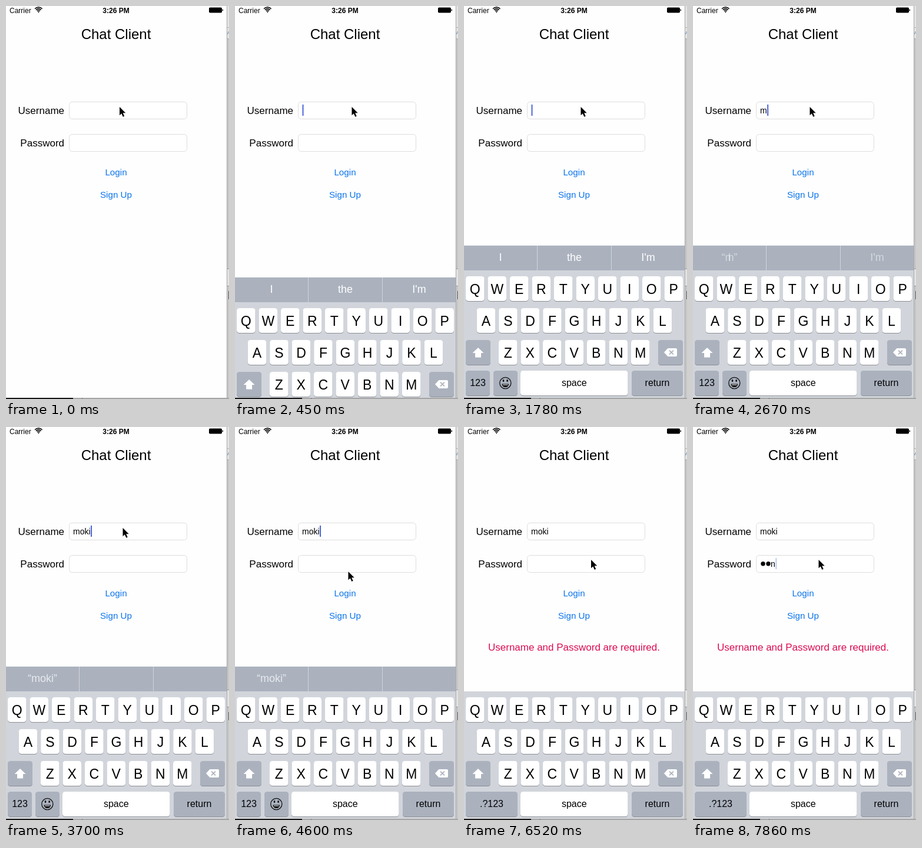
These frames come from a looping animation (379x666 px, 8000 ms). An HTML page with a canvas:

```html
<!DOCTYPE html>
<html lang="en">
<head>
<meta charset="utf-8">
<title>Chat Client login</title>
<style>
html, body { margin: 0; width: 100%; height: 100%; overflow: hidden; }
canvas { display: block; width: 379px; height: 666px; }
</style>
</head>
<body>
<canvas id="stage"></canvas>
<script>
const W = 379, H = 666, LOOP = 8000, STEPS = 54, STEP = LOOP / STEPS;
const FONT = '"Liberation Sans", Arial, sans-serif';
const BAR = '#abb2be', KEYBOARD = '#d1d5db', BLUE = '#0b74ec';
const USER = 'moki';

const FOCUS = 2, TYPED = [16, 19, 22, 24], ERROR = 35, PASSWORD = 39;
const SECRET = [[46, 'm'], [47, 'l'], [49, 'n']];
const POINTER = [[1, 193, 171], [2, 198.5, 171], [28, 198.5, 171], [31, 192.5, 245],
  [33, 187, 277], [35, 187, 277], [38, 216, 225], [52, 216, 225], [53, 213.5, 225]];
const BLINK = [1, 1, 1, 1, 0.35, 0, 0];

const canvas = document.getElementById('stage');
const ctx = canvas.getContext('2d');
const ratio = window.devicePixelRatio || 1;
canvas.width = W * ratio;
canvas.height = H * ratio;

const clamp = v => Math.max(0, Math.min(1, v));

function text(str, x, y, size, color = '#000', align = 'left', weight = '') {
  ctx.font = `${weight} ${size}px ${FONT}`;
  ctx.textAlign = align;
  ctx.fillStyle = color;
  ctx.fillText(str, x, y);
}

function rect(x, y, w, h, color) {
  ctx.fillStyle = color;
  ctx.fillRect(x, y, w, h);
}

function rounded(x, y, w, h, r, color) {
  ctx.beginPath();
  ctx.roundRect(x, y, w, h, r);
  ctx.fillStyle = color;
  ctx.fill();
}

function shape(path, x, y, fill, stroke, width = 1) {
  ctx.save();
  ctx.translate(x, y);
  const p = new Path2D(path);
  if (stroke) {
    ctx.strokeStyle = stroke;
    ctx.lineWidth = width;
    ctx.stroke(p);
  }
  if (fill) {
    ctx.fillStyle = fill;
    ctx.fill(p);
  }
  ctx.restore();
}

function faded(alpha, draw) {
  if (alpha <= 0) return;
  ctx.save();
  ctx.globalAlpha *= alpha;
  draw();
  ctx.restore();
}

function drawDesktop() {
  rect(0, 0, W, H, '#c6c6c6');
  rect(375, 0, 4, 55, '#e3e3e3');
  rect(375, 36, 4, 1, '#bfae9f');
  rect(375, 55, 4, 1, '#aaa');
  text('w', 375, 48, 9, '#7b9cc0');
  rect(375, 445, 4, 30, '#e2e2e2');
  rect(375, 445, 4, 1, '#999');
  rect(375, 474, 4, 1, '#999');
  rect(378, 483, 1, 14, '#555');
  rect(375, 0, 1, H, '#a9a9a9');
  rect(0, 664, W, 2, '#a5a5a5');
  rect(0, 664, 114, 2, '#161616');
  rect(129, 664, 1, 2, '#777');
  rect(0, 0, 375, 664, '#fefefe');
}

function drawStatus() {
  text('Carrier', 6, 11.5, 12);
  text('3:26 PM', 187, 11.5, 12, '#000', 'center', 'bold');
  for (const r of [3.3, 6.1, 8.9]) {
    ctx.beginPath();
    ctx.arc(55.3, 11, r, -Math.PI * 0.75, -Math.PI * 0.25);
    ctx.strokeStyle = '#000';
    ctx.lineWidth = 1.6;
    ctx.stroke();
  }
  shape('M0 0L-1.5-1.6Q0-2.6 1.5-1.6Z', 55.3, 11.4, '#000');
  rounded(345, 2.5, 22, 9, 1.8, '#000');
  rounded(367.6, 5.5, 1.4, 3, 0.7, '#000');
}

function drawField(label, y) {
  text(label, 99, y + 20.5, 17, '#000', 'right');
  ctx.beginPath();
  ctx.roundRect(107.5, y + 0.5, 200, 29, 5);
  ctx.fillStyle = '#fff';
  ctx.fill();
  ctx.strokeStyle = '#dedede';
  ctx.lineWidth = 1;
  ctx.stroke();
}

function drawCaret(x, y, since) {
  faded(BLINK[since % BLINK.length], () => rect(x, y, 2, 19, '#4964dd'));
}

function drawForm(step) {
  text('Chat Client', 187, 56, 24, '#000', 'center');
  drawField('Username', 162);
  drawField('Password', 217);
  text('Login', 187, 287, 15.2, BLUE, 'center');
  text('Sign Up', 187, 325, 15.2, BLUE, 'center');
  if (step >= ERROR)
    text('Username and Password are required.', 187, 379, 17, '#dc0b51', 'center');

  const typed = TYPED.filter(s => s <= step);
  const name = USER.slice(0, typed.length);
  text(name, 114, 182, 14);
  if (step >= FOCUS && step < PASSWORD)
    drawCaret(114.5 + ctx.measureText(name).width, 167, step - (typed.at(-1) ?? FOCUS));

  if (step < PASSWORD) return;
  const secret = SECRET.filter(([s]) => s <= step);
  const [last, letter] = secret.at(-1) ?? [PASSWORD, ''];
  const hidden = Math.max(0, secret.length - 1);
  for (let i = 0; i < hidden; i++) rounded(115.3 + 9 * i, 228, 7.4, 7.4, 3.7, '#000');
  text(letter, 114 + 9 * hidden, 237, 14);
  drawCaret(114.5 + 9 * hidden + ctx.measureText(letter).width, 222, step - last);
}

function drawSuggestions(step) {
  rect(0, 406, 375, 42, BAR);
  for (const x of [124, 250]) rect(x, 406, 1, 42, '#d0d4da');
  const put = (str, x) => text(str, x, 432, 18, '#fff', 'center');
  const fade = clamp((step - TYPED[0]) / 4);
  faded(1 - fade, () => {
    put('I', 62);
    put("I'm", 313);
  });
  if (step < TYPED[0]) put('the', 187.5);
  // The bar follows the field one step late.
  const count = Math.max(1, TYPED.filter(s => s < step).length);
  faded(0.72 * clamp(fade * 1.4), () => put(`“${USER.slice(0, count)}”`, 62));
}

function drawKey(x, y, w, label, size, dark) {
  rounded(x, y + 1, w, 42, 4.5, '#8b8f95');
  rounded(x, y, w, 42, 4.5, dark ? BAR : '#fff');
  text(label, x + w / 2, y + (size > 18 ? 29.5 : 26), size, '#000', 'center');
}

function drawKeyRow(letters, x, y) {
  [...letters].forEach((c, i) => drawKey(x + 37.5 * i, y, 31.5, c, 23));
}

function drawEmoji() {
  shape('M9.6 0A9.6 9.6 0 1 1-9.6 0A9.6 9.6 0 1 1 9.6 0Z', 70.3, 639, null, '#111', 1.3);
  shape('M-6 1.5H6Q5 7 0 7T-6 1.5Z', 70.3, 639, '#111');
  shape('M-4.2 3H4.2', 70.3, 639, null, '#fff', 1);
  for (const x of [67, 73.6]) rounded(x - 1.2, 633, 2.4, 4, 1.2, '#111');
}

function drawKeyboard(step) {
  const swap = clamp((step - PASSWORD + 1) / 3);
  faded(1 - swap, () => drawSuggestions(step));
  rect(0, 448, 375, 260, KEYBOARD);
  drawKeyRow('QWERTYUIOP', 3, 458);
  drawKeyRow('ASDFGHJKL', 21.7, 512);
  drawKeyRow('ZXCVBNM', 59, 566);
  drawKey(3, 566, 42, '', 16, true);
  drawKey(330, 566, 42, '', 16, true);
  shape('M0-9L9.5 0H5V7.5H-5V0H-9.5Z', 24, 588, '#fff');
  shape('M-11 0L-4.5-7H9Q11-7 11-5V5Q11 7 9 7H-4.5Z', 351, 587, '#fff');
  shape('M-3-3.3L4 3.3M4-3.3L-3 3.3', 352, 587, null, BAR, 1.7);
  drawKey(96, 618, 182.5, 'space', 16);
  drawKey(285, 618, 87, 'return', 16, true);
  if (swap < 1) {
    drawKey(3, 618, 41, '123', 16, true);
    drawKey(50, 618, 41, '', 16, true);
    drawEmoji();
  }
  faded(swap, () => drawKey(3, 618, 88, '.?123', 16, true));
}

function drawPointer(step) {
  let i = POINTER.findIndex(([s]) => s >= step);
  if (i < 0) i = POINTER.length - 1;
  const [s1, x1, y1] = POINTER[i];
  const [s0, x0, y0] = POINTER[Math.max(0, i - 1)];
  const p = s1 > s0 ? clamp((step - s0) / (s1 - s0)) : 1;
  const arrow = 'M0 0V14.2L3.3 11.2L5.8 16.8L8.2 15.7L5.7 10.3H10.2Z';
  shape(arrow, x0 + (x1 - x0) * p, y0 + (y1 - y0) * p, '#000', '#fff', 2);
}

function render(now) {
  const step = Math.min(STEPS - 1, Math.floor((now % LOOP + 5) / STEP));
  ctx.setTransform(ratio, 0, 0, ratio, 0, 0);
  drawDesktop();
  drawStatus();
  drawForm(step);
  if (step >= FOCUS) {
    // Critically damped spring slides the keyboard up.
    const u = 18.26 * (step * STEP - 283) / 1000;
    ctx.save();
    ctx.beginPath();
    ctx.rect(0, 0, 375, 664);
    ctx.clip();
    ctx.translate(0, Math.round(260 * (1 + u) * Math.exp(-u)));
    drawKeyboard(step);
    ctx.restore();
  }
  drawPointer(step);
}

const start = performance.now();
function tick() {
  render(performance.now() - start);
  requestAnimationFrame(tick);
}
tick();
</script>
</body>
</html>
```
